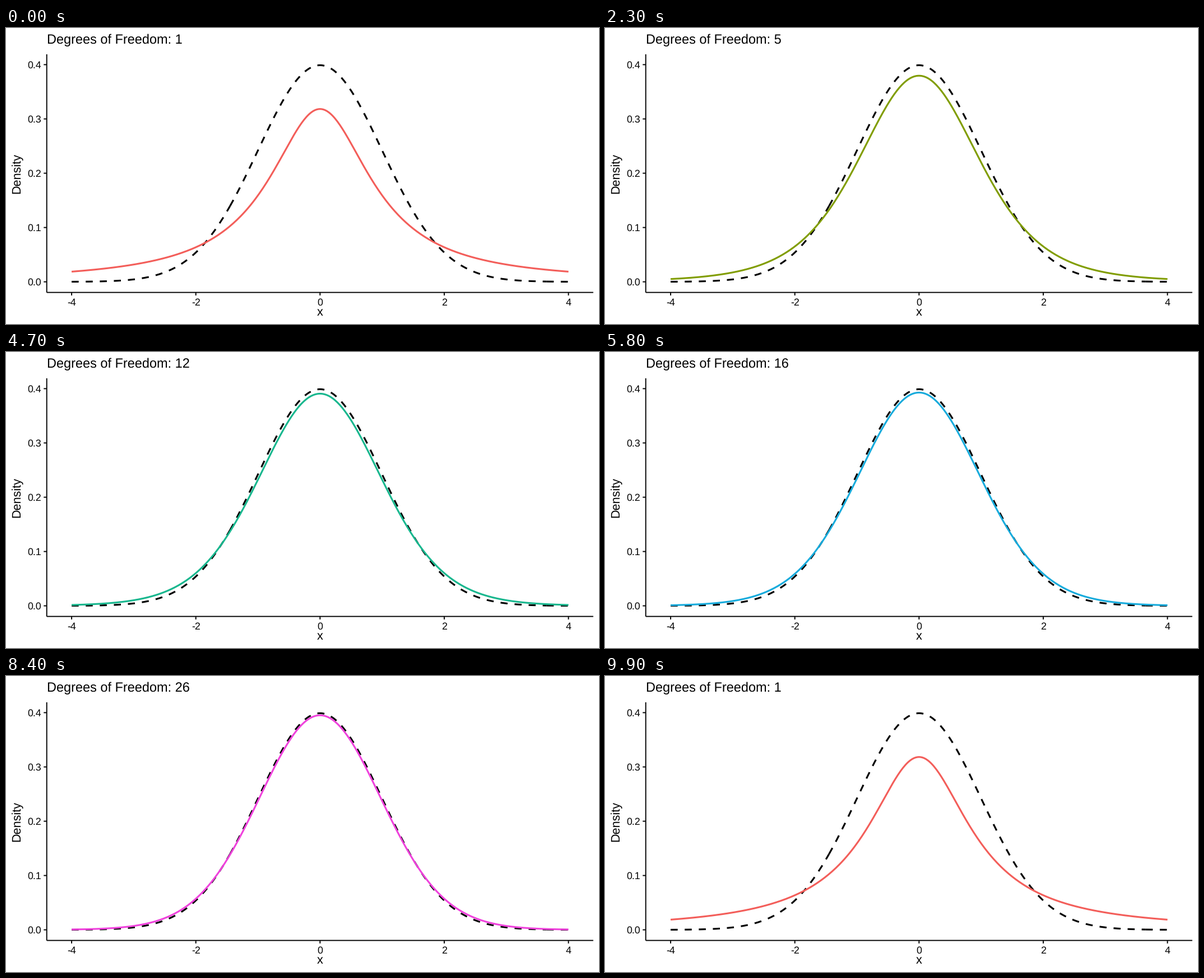
Write a matplotlib script that moves like this. It is 1058 px wide and 529 px high and loops after 10000 ms.

```python
import math

import numpy as np
import matplotlib.pyplot as plt
from matplotlib.animation import FuncAnimation

WIDTH, HEIGHT, DPI = 1058, 529, 64
LEFT, RIGHT, TOP, BOTTOM = 72.7, 1047.8, 47, 472.6
CURVE_WIDTH, AXIS_WIDTH, TICK = 3.14, 1.9, 5.4
TITLE_SIZE, AXIS_SIZE, TICK_SIZE = 23.5, 21.6, 17.7
FRAME_MS, FRAMES = 100, 100

DEGREES = [1, 2, 3, 4, 5] + list(range(6, 31, 2))
# Times (in frames) at which the next number of degrees appears.
CHANGES = [5, 11, 17, 23, 29, 35, 41, 47, 52, 58, 64, 69, 74, 79, 84, 89, 94, 99]
HUES = """F8766D E88526 D39200 B79F00 93AA00 5EB300 00BA38 00BF74 00C19F
          00BFC4 00B9E3 00ADFA 619CFF AE87FF DB72FB F564E3 FF61C3 FF699C""".split()

# Linear sRGB to the wider-gamma display space the colours are shown in.
DISPLAY = np.array([[0.973, 0.027, 0.0],
                    [-0.0227, 1.0577, -0.035],
                    [0.0, 0.0, 1.0]])

plt.rcParams.update({"font.family": "Liberation Sans", "text.hinting": "none"})


def display_color(code):
    rgb = np.array([int(code[i:i + 2], 16) for i in (0, 2, 4)]) / 255
    linear = np.where(rgb <= 0.04045, rgb / 12.92, ((rgb + 0.055) / 1.055) ** 2.4)
    return tuple(np.clip(DISPLAY @ linear, 0, 1) ** (1 / 1.8))


def points(pixels):
    return pixels * 72 / DPI


def px(x):
    return 560.3 + 110.8 * x


def py(density):
    return 453.6 - 970.3 * density


def normal(x):
    return np.exp(-x ** 2 / 2) / math.sqrt(2 * math.pi)


def student_t(x, df):
    scale = math.gamma((df + 1) / 2) / (math.sqrt(df * math.pi) * math.gamma(df / 2))
    return scale * (1 + x ** 2 / df) ** (-(df + 1) / 2)


fig = plt.figure(figsize=(WIDTH / DPI, HEIGHT / DPI), dpi=DPI, facecolor="white")
ax = fig.add_axes([0, 0, 1, 1])
ax.set_xlim(0, WIDTH)
ax.set_ylim(HEIGHT, 0)
ax.axis("off")


def label(x, y, text, size, ha="center", **kwargs):
    return ax.text(x, y, text, fontsize=points(size), ha=ha, va="baseline",
                   color="black", **kwargs)


def stroke(xs, ys, width, color="black", **kwargs):
    line, = ax.plot(xs, ys, lw=points(width), color=color, snap=False,
                    solid_capstyle="butt", dash_capstyle="butt",
                    solid_joinstyle="miter", **kwargs)
    return line


# The dash pattern starts afresh on each stretch of the normal curve.
STRETCH = 2.55
for start in np.arange(-4, 4, STRETCH):
    part = np.linspace(start, min(start + STRETCH, 4), 130)
    stroke(px(part), py(normal(part)), CURVE_WIDTH, linestyle=(0, (4, 4)))

x = np.linspace(-4, 4, 401)
curve = stroke(px(x), py(normal(x)), CURVE_WIDTH)

stroke([LEFT, LEFT], [TOP, BOTTOM], AXIS_WIDTH)
stroke([LEFT, RIGHT], [BOTTOM, BOTTOM], AXIS_WIDTH)
for value in range(-4, 5, 2):
    stroke([px(value)] * 2, [BOTTOM, BOTTOM + TICK], AXIS_WIDTH)
    label(px(value), 495.6, str(value), TICK_SIZE)
for value in np.arange(5) / 10:
    stroke([LEFT - TICK, LEFT], [py(value)] * 2, AXIS_WIDTH)
    label(63.2, py(value) + 6.2, f"{value:.1f}", TICK_SIZE, ha="right")

label(560.3, 514.3, "x", AXIS_SIZE)
label(25.6, 259.8, "Density", AXIS_SIZE, rotation=90, rotation_mode="anchor")
title = label(72.7, 27.8, "", TITLE_SIZE, ha="left")


def draw(frame):
    step = int(np.searchsorted(CHANGES, frame, side="right")) % len(DEGREES)
    df = DEGREES[step]
    curve.set_ydata(py(student_t(x, df)))
    curve.set_color(display_color(HUES[step]))
    title.set_text(f"Degrees of Freedom: {df}")
    return curve, title


animation = FuncAnimation(fig, draw, frames=FRAMES, interval=FRAME_MS,
                          repeat=True, repeat_delay=0)
plt.show()
```
